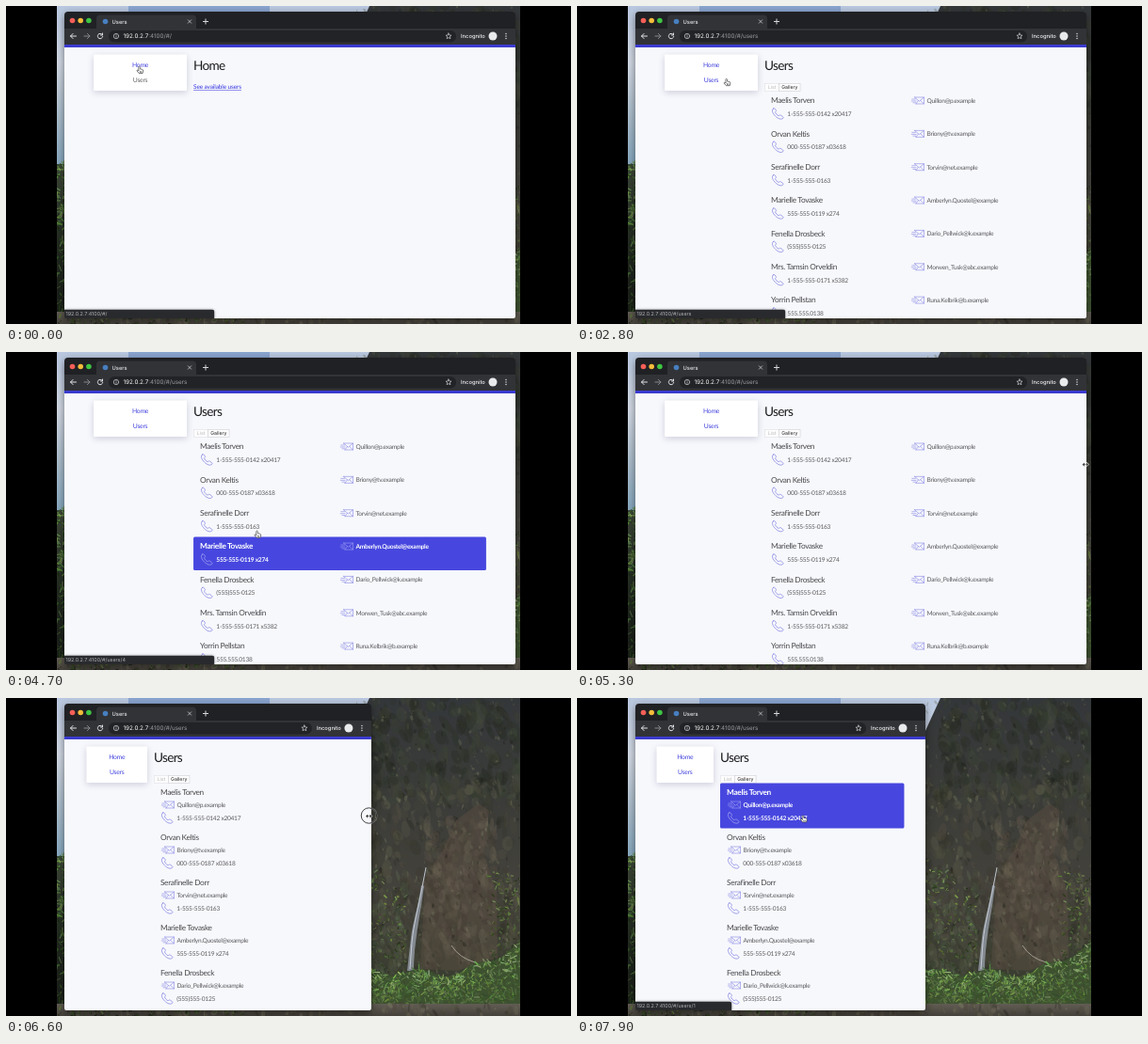
An HTML page with a canvas that plays this animation: 600 px wide and 338 px high, repeating every 8000 ms.

```html
<!DOCTYPE html>
<html lang="en">
<head>
<meta charset="utf-8">
<title>Users</title>
<style>
html, body { margin: 0; width: 100%; height: 100%; overflow: hidden; background: #000; }
canvas { display: block; width: 600px; height: 338px; }
</style>
</head>
<body>
<canvas id="stage" width="600" height="338"></canvas>
<script>
const ctx = document.getElementById('stage').getContext('2d');
const LOOP = 8000, LEFT = 62, BOTTOM = 332;
const BLUE = '#3b3bd0', LINK = '#4444dd';
const HOST = '192.0.2.7', PORT = ':4100';
const BODY = 'Lato, sans-serif', UI = 'Inter, sans-serif';

const users = [
  ['Maelis Torven', '1-555-555-0142 x20417', 'Quillon@p.example'],
  ['Orvan Keltis', '000-555-0187 x03618', 'Briony@tv.example'],
  ['Serafinelle Dorr', '1-555-555-0163', 'Torvin@net.example'],
  ['Marielle Tovaske', '555-555-0119 x274', 'Amberlyn.Quostel@example'],
  ['Fenella Drosbeck', '(555)555-0125', 'Dario_Pellwick@k.example'],
  ['Mrs. Tamsin Orveldin', '1-555-555-0171 x5382', 'Morwen_Tusk@abc.example'],
  ['Yorrin Pellstan', '555.555.0138', 'Runa.Kelbrik@b.example']
];

// time, values...
const pointer = [
  [0, 141.5, 64.5], [400, 141.5, 64.5], [900, 143, 71.5], [2700, 143, 71.5],
  [3300, 236, 108], [3800, 243, 158.5], [4200, 262, 214], [4500, 267, 216],
  [4700, 266, 190.5], [5300, 540, 119], [5800, 540, 119], [6100, 483, 120],
  [6600, 385.5, 125], [6800, 370, 127], [7100, 370, 127], [7600, 240, 125]
];
const edge = [[0, 541], [5820, 541], [6100, 497], [6600, 388], [6800, 370]];

function track(keys, t) {
  const i = keys.findIndex(k => k[0] > t);
  if (i < 0) return keys[keys.length - 1].slice(1);
  if (i === 0) return keys[0].slice(1);
  const a = keys[i - 1], b = keys[i], p = (t - a[0]) / (b[0] - a[0]);
  return a.slice(1).map((v, n) => v + (b[n + 1] - v) * p);
}

function box(c, x, y, w, h, fill, r = 0) {
  c.fillStyle = fill;
  c.beginPath();
  c.roundRect(x, y, w, h, r);
  c.fill();
}

function dot(x, y, r, fill) {
  ctx.fillStyle = fill;
  ctx.beginPath();
  ctx.arc(x, y, r, 0, 7);
  ctx.fill();
}

function text(s, x, y, size, color, { weight = 400, font = BODY, align = 'left', track = -0.04 } = {}) {
  ctx.textRendering = 'geometricPrecision';
  ctx.font = `${weight} ${size}px ${font}`;
  ctx.letterSpacing = (font === BODY ? track * size : 0) + 'px';
  ctx.textAlign = align;
  ctx.textBaseline = 'alphabetic';
  ctx.fillStyle = color;
  ctx.fillText(s, x, y);
  return ctx.measureText(s).width;
}

function stroke(d, x, y, color, width, fill) {
  ctx.save();
  ctx.translate(x, y);
  const p = new Path2D(d);
  if (fill) { ctx.fillStyle = fill; ctx.fill(p); }
  ctx.strokeStyle = color;
  ctx.lineWidth = width;
  ctx.lineCap = ctx.lineJoin = 'round';
  ctx.stroke(p);
  ctx.restore();
}

function makeBackdrop() {
  const cv = document.createElement('canvas');
  cv.width = 600; cv.height = 338;
  const c = cv.getContext('2d');
  let seed = 7;
  const rnd = () => (seed = (seed * 16807) % 2147483647) / 2147483647;
  const fade = (y0, y1, ...cols) => {
    const g = c.createLinearGradient(0, y0, 0, y1);
    cols.forEach((col, i) => g.addColorStop(i / (cols.length - 1), col));
    return g;
  };
  const shape = (d, fill) => { c.fillStyle = fill; c.fill(new Path2D(d)); };
  const leaves = (n, x0, x1, top, bottom, hue, light, size = 3) => {
    for (let i = 0; i < n; i++) {
      const x = x0 + rnd() * (x1 - x0), y0 = top(x), y = y0 + rnd() * (bottom - y0);
      const a = rnd() * 6.3, len = size * (0.6 + rnd());
      const pale = light + rnd() * 40 * (1 - 0.6 * (y - y0) / (bottom - y0)) - 10;
      c.strokeStyle = `hsl(${hue + rnd() * 22},${18 + rnd() * 24}%,${pale}%)`;
      c.lineWidth = 0.6 + rnd();
      c.beginPath();
      c.moveTo(x, y);
      c.lineTo(x + Math.cos(a) * len, y + Math.sin(a) * len);
      c.stroke();
    }
  };
  const patches = (n, x0, x1, y0, y1, hue, l0, l1, alpha, size) => {
    for (let i = 0; i < n; i++) {
      c.fillStyle = `hsla(${hue + rnd() * 25},12%,${l0 + rnd() * (l1 - l0)}%,${alpha})`;
      c.beginPath();
      c.ellipse(x0 + rnd() * (x1 - x0), y0 + rnd() * (y1 - y0),
        size * (0.2 + rnd() * 0.5), size * (0.3 + rnd()), 0.3 - rnd(), 0, 7);
      c.fill();
    }
  };
  box(c, 54, 0, 492, 338, fade(0, 180, '#b9c8e0', '#d3dae5', '#a9bccb', '#7fa4bd'));
  box(c, 130, 0, 150, 6, '#8aa5d0');
  box(c, 54, 168, 20, 170, fade(168, 338, '#3d4738', '#222a20', '#171b16'));
  leaves(170, 52, 66, () => 165, 330, 85, 22, 5);
  shape('M386 0H546V338H340V60L366 44L374 26Z', fade(0, 330, '#34373a', '#3b3c39', '#45433c', '#343a2b'));
  patches(240, 385, 546, 0, 110, 75, 12, 27, 0.35, 9);
  patches(420, 372, 546, 90, 290, 40, 13, 38, 0.28, 8);
  shape('M502 112L513 120 507 165 521 205 522 276 480 290 440 288 445 190 465 160 478 130Z', 'rgba(98,82,70,.38)');
  patches(200, 446, 520, 130, 285, 22, 20, 42, 0.28, 7);
  patches(90, 366, 425, 180, 295, 80, 18, 40, 0.3, 7);
  patches(550, 370, 546, 0, 295, 55, 8, 48, 0.35, 2.5);
  leaves(220, 366, 425, x => 170 + (x - 366) * 0.6, 300, 75, 24);
  leaves(160, 515, 546, () => 185, 285, 75, 24);
  shape('M441 199C438 222 432 238 430 255L426 290H433C433 262 439 236 444 200Z', 'rgba(160,168,182,.7)');
  c.strokeStyle = '#ccd2dc';
  c.lineWidth = 0.9;
  c.stroke(new Path2D('M446 180L442 201C437 226 433 240 431 260L429 288'));
  c.strokeStyle = '#aaa69a';
  c.stroke(new Path2D('M473 263Q481 276 498 281'));
  const hedge = x => 292 + 4 * Math.sin(x / 9) - Math.max(0, x - 485) * 0.5;
  c.fillStyle = '#3d5130';
  c.beginPath();
  c.moveTo(366, 330);
  for (let x = 366; x <= 546; x += 4) c.lineTo(x, hedge(x));
  c.lineTo(546, 330);
  c.fill();
  leaves(1000, 368, 546, hedge, 325, 82, 32, 4);
  box(c, 54, 325, 492, 13, fade(325, 338, '#625d54', '#45413b'));
  patches(160, 54, 546, 326, 338, 35, 15, 45, 0.4, 4);
  leaves(90, 54, 250, () => 331, 338, 80, 18);
  box(c, 0, 0, 54, 338, '#000');
  box(c, 546, 0, 54, 338, '#000');
  return cv;
}
const backdrop = makeBackdrop();

function layout(right) {
  const w = right - LEFT, pad = 7.15 + 0.05 * w, inner = w - 2 * pad;
  const card = (inner - 21) / 4, x = LEFT + pad;
  const wide = w > 458;
  return { right, wide, cardX: x, card, x: x + card + 7, w: inner - card - 7, pitch: wide ? 35.35 : 48 };
}

function hoverAt(t, L, page) {
  const [x, y] = track(pointer, t);
  if (x > L.cardX && x < L.cardX + L.card) {
    if (y > 57 && y < 70) return { path: '/#/' };
    if (y >= 70 && y < 86) return { path: '/#/users' };
  }
  const i = Math.floor((y - 90.5) / L.pitch);
  if (page === 'users' && x > L.x && x < L.x + L.w && i >= 0 && i < users.length)
    return { row: i, path: '/#/users/' + (i + 1) };
  return {};
}

function chrome(right, path) {
  ctx.save();
  ctx.shadowColor = 'rgba(0,0,0,.5)';
  ctx.shadowBlur = 9;
  ctx.shadowOffsetY = 3;
  box(ctx, LEFT, 6, right - LEFT, BOTTOM - 6, '#202124', [4, 4, 2, 2]);
  ctx.restore();
  ['#f45f57', '#f6bd3b', '#3fc544'].forEach((c, i) => dot(70.5 + i * 8.7, 15.5, 2.8, c));
  box(ctx, 96, 9.5, 106, 16, '#323337', [4, 4, 0, 0]);
  box(ctx, LEFT, 24, right - LEFT, 17, '#323337');
  box(ctx, 109, 26, right - 63 - 109, 12.5, '#222326', 6);
  dot(105.5, 16.5, 2.8, '#477fc0');
  text('Users', 112.5, 18.8, 5.8, '#e4e6e9', { font: UI, weight: 500 });
  stroke('M-1.7 -1.7L1.7 1.7M1.7 -1.7L-1.7 1.7', 195, 16.5, '#c8cacd', 0.8);
  stroke('M-2.6 0H2.6M0 -2.6V2.6', 212, 16.5, '#d5d7da', 1);
  stroke('M3 0H-3M-.4 -2.6L-3 0L-.4 2.6', 71.5, 32, '#e2e3e5', 1);
  stroke('M-3 0H3M.4 -2.6L3 0L.4 2.6', 86, 32, '#85878b', 1);
  stroke('M2.2 -1.6A2.7 2.7 0 1 0 2.7 .5M2.5 -3V-1H.5', 100, 32, '#e2e3e5', 1);
  stroke('M2.7 0A2.7 2.7 0 1 1 -2.7 0A2.7 2.7 0 1 1 2.7 0M0 -.2V1.3M0 -1.4V-1.3', 117, 32, '#cfd1d4', 0.7);
  const w = text(HOST, 124.5, 34.2, 6.3, '#fafafa', { font: UI });
  text(PORT + path, 124.5 + w, 34.2, 6.3, '#9a9da2', { font: UI });
  stroke('M0 -3L.9 -1L3 -.8L1.4 .6L1.9 2.7L0 1.6L-1.9 2.7L-1.4 .6L-3 -.8L-.9 -1Z', right - 71, 32, '#d0d2d5', 0.7);
  text('Incognito', right - 58, 34.2, 5.8, '#f2f2f3', { font: UI, weight: 500 });
  dot(right - 24, 32, 4.5, '#e9eaec');
  for (const d of [-2.4, 0, 2.4]) dot(right - 10, 32 + d, 0.75, '#dcdde0');
  box(ctx, LEFT, 41, right - LEFT, BOTTOM - 41, '#f7f8fc', [0, 0, 2, 2]);
  box(ctx, LEFT, 41, right - LEFT, 3, BLUE);
}

function menu(L, page) {
  ctx.save();
  ctx.shadowColor = 'rgba(60,60,100,.22)';
  ctx.shadowBlur = 7;
  ctx.shadowOffsetY = 2;
  box(ctx, L.cardX, 51.5, L.card, 38.5, '#fff', 1);
  ctx.restore();
  const mid = L.cardX + L.card / 2;
  text('Home', mid, 65.4, 6.8, LINK, { align: 'center' });
  text('Users', mid, 81.4, 6.8, page === 'home' ? '#666' : LINK, { align: 'center' });
}

function mail(x, y, color) {
  stroke('M3 -3.5H13V3.5H4.5M3 -3.5L8 .8L13 -3.5M4.5 3.5L7 0M13 3.5L9.3 0M.3 -1.5H4M-.2 .5H4.6M1.5 2.3H4.2', x, y, color, 0.6);
}

function phone(x, y, color) {
  stroke('M1.5 -5.5C-.5 -4.6 .2 -1.3 2.7 1.6C5.2 4.5 8.7 6.5 11 5.3C12.4 4.5 12.3 3.8 11.3 3L9.3 1.6C8.2 1 7.8 2.2 7 2.2C5.8 1.9 3.7 -.5 3.5 -1.6C3.6 -2.3 4.8 -2.5 4.3 -3.6L3 -5.4C2.6 -5.9 2.1 -5.9 1.5 -5.5Z', x, y, color, 0.75);
}

function row(user, i, L, on) {
  const top = 90.5 + i * L.pitch;
  if (on) box(ctx, L.x, top, L.w, L.pitch, '#4747df', 1.5);
  const ink = on ? '#fff' : '#5a5a5c', icon = on ? '#a3a3f2' : '#8585e2', weight = on ? 700 : 400;
  const mx = L.wide ? L.x + L.w / 2 : L.x + 7.5;
  const my = top + (L.wide ? 10 : 23), py = top + (L.wide ? 24 : 37);
  text(user[0], L.x + 7, top + 12.7, 8.3, on ? '#fff' : '#4a4a4c', { weight });
  mail(mx + 1, my, icon);
  text(user[2], mx + 17, my + 2.4, 6.6, ink, { weight });
  phone(L.x + 8, py, icon);
  text(user[1], L.x + 24.3, py + 2.4, 6.6, ink, { weight });
}

function button(label, x, w, color, border) {
  box(ctx, x, 82.5, w, 8, '#fdfdfe', 0.5);
  ctx.strokeStyle = border;
  ctx.lineWidth = 0.6;
  ctx.strokeRect(x, 82.5, w, 8);
  text(label, x + w / 2, 88.4, 5.2, color, { font: UI, align: 'center' });
}

function hand(x, y) {
  stroke('M-.8 .5C-.7 -.6 .7 -.6 .8 .5V2.4L3.4 2.9Q4.4 3.2 4.2 4.6L3.6 7H-.3L-2.5 4.4C-2.8 3.6 -1.8 3.3 -.8 4.2ZM.8 5V6M2.2 5V6', x, y, '#333', 0.65, '#fff');
}

function arrow(x, y) {
  stroke('M0 0V7L1.7 5.5L2.8 8L3.9 7.5L2.8 5.1H5Z', x, y, '#fff', 0.5, '#111');
}

function resizer(x, y, pressed) {
  if (pressed) {
    const ring = 'M8.2 0A8.2 8.2 0 1 1 -8.2 0A8.2 8.2 0 1 1 8.2 0';
    stroke(ring, x, y, 'rgba(255,255,255,.35)', 1.8);
    stroke(ring, x, y, '#2a2a2c', 0.9);
  }
  const arrows = 'M-3 .5L-1.3 -.9V1.9ZM3 .5L1.3 -.9V1.9ZM-1.5 .5H1.5';
  stroke(arrows, x, y, '#fff', 1.6);
  stroke(arrows, x, y, '#222', 0.4, '#222');
}

function status(L, path) {
  const w = (L.right - LEFT) / 3 - 0.5;
  ctx.save();
  ctx.shadowColor = 'rgba(0,0,0,.4)';
  ctx.shadowBlur = 3;
  box(ctx, LEFT, 322.8, w, 9.2, '#292a2d', [0, 2, 0, 1]);
  ctx.restore();
  text(HOST + PORT + path, 63.5, 329.2, 5.4, '#b4b6ba', { font: UI });
}

function draw(t) {
  const page = t < 1000 ? 'home' : 'users';
  const L = layout(track(edge, t)[0]);
  const dragging = t >= 5300 && t < 7100;
  const hover = dragging ? {} : hoverAt(Math.max(0, t - 110), L, page);
  ctx.drawImage(backdrop, 0, 0);
  chrome(L.right, page === 'home' ? '/#/' : '/#/users');
  ctx.save();
  ctx.beginPath();
  ctx.rect(LEFT, 41, L.right - LEFT, BOTTOM - 41);
  ctx.clip();
  menu(L, page);
  text(page === 'home' ? 'Home' : 'Users', L.x, 68, 13.6, '#1c1c1e', { track: -0.05 });
  if (page === 'home') {
    const w = text('See available users', L.x, 88.3, 6.5, '#3333e0', { track: -0.02 });
    box(ctx, L.x, 89.2, w, 0.6, '#3333e0');
  } else {
    button('List', L.x + 0.5, 15, '#bbb', '#e2e2e6');
    button('Gallery', L.x + 15.5, 22.5, '#222', '#cfcfd4');
    users.forEach((u, i) => row(u, i, L, hover.row === i));
  }
  if (hover.path) status(L, hover.path);
  ctx.restore();
  const [x, y] = track(pointer, t);
  if (dragging) resizer(x, y, t > 5700 && t < 6900);
  else (hover.path ? hand : arrow)(x, y);
}

const start = performance.now();
function frame() {
  draw((performance.now() - start) % LOOP);
  requestAnimationFrame(frame);
}
frame();
</script>
</body>
</html>
```
